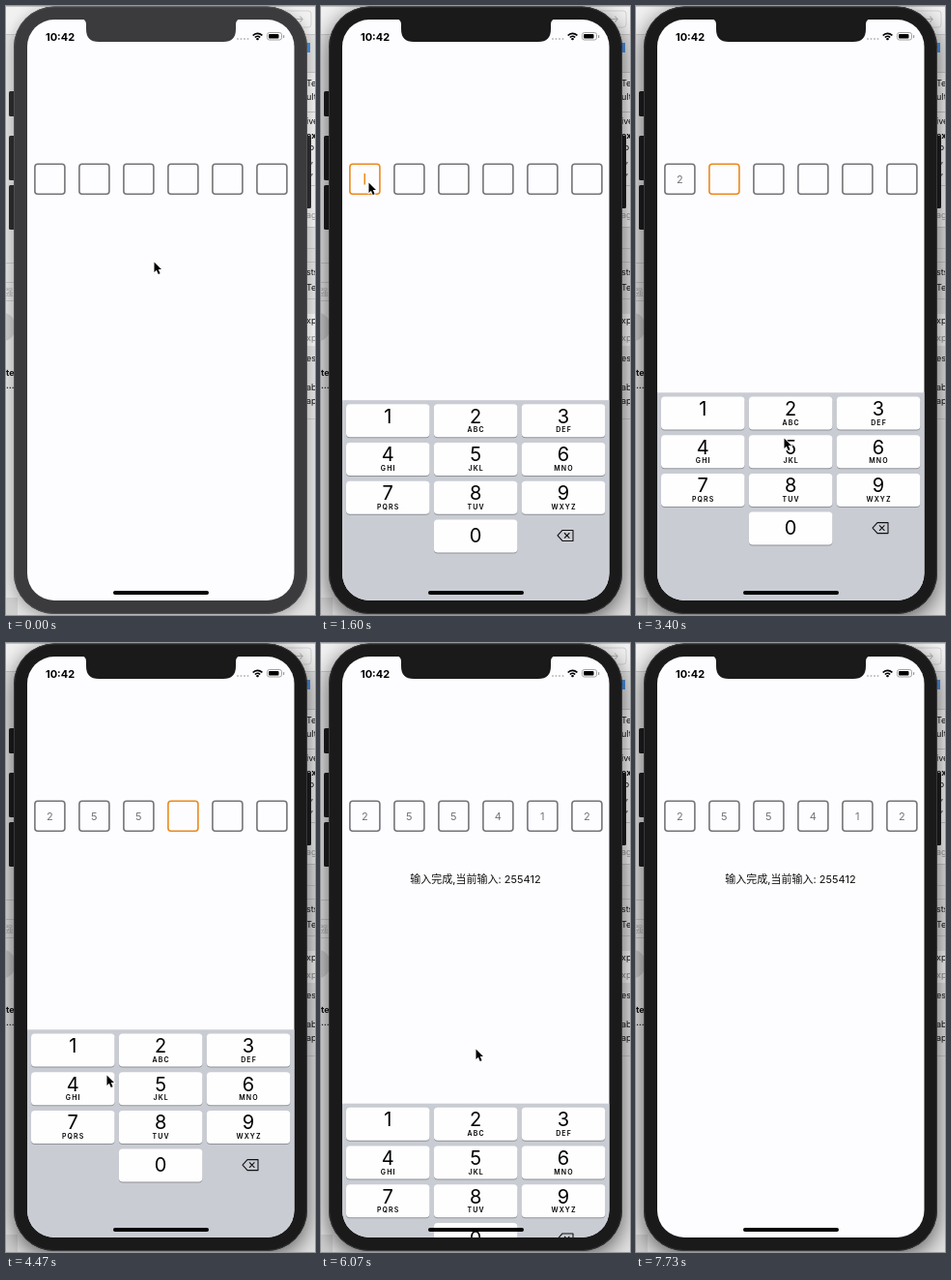
An HTML page with a canvas that plays this animation: 320 by 629 pixels, repeating every 7.87 s.

```html
<!DOCTYPE html>
<html lang="zh">
<head>
<meta charset="utf-8">
<title>Code input</title>
<style>
html, body { margin: 0; width: 100%; height: 100%; overflow: hidden; background: #ddd; }
canvas { display: block; width: 320px; height: 629px; }
</style>
</head>
<body>
<canvas id="stage" width="320" height="629"></canvas>
<script>
const c = document.getElementById('stage').getContext('2d');
const LOOP = 7870, ACTIVATE = 1200, SHOW = 1310, SELECT = 1330, DONE = 6000;
const FONT = 'Inter, "Noto Sans CJK SC", "Noto Sans CJK", sans-serif';
const ORANGE = '#e98a1d', GREY = '#747478', WHITE = '#fdfcfe';
const KEYBOARD_H = 215;

// [time typed, digit]
const typed = [[2733, 2], [3670, 5], [4000, 5], [4530, 4], [5067, 1], [DONE, 2]];

// [time, x, y]
const pointerPath = [
  [0, 153, 264], [670, 153, 264], [1130, 49, 182], [1670, 49, 182],
  [2070, 150, 408], [2270, 150, 408], [2400, 153, 412], [2870, 153, 412],
  [3330, 153, 446], [4070, 153, 446], [4330, 104, 446], [4670, 104, 446],
  [5000, 83, 418], [5330, 83, 418], [5800, 160, 419], [6800, 160, 419],
  [7330, 101, 338], [7540, 101, 338], [7700, 20, 291]
];

// [text, baseline, colour, weight] for the window edges behind the phone
const rightScraps = [
  ['Te', 83], ['ult', 97], ['ive', 122], ['ex', 137, '#111', 700], ['to', 149], ['s,', 162], ['s,', 174],
  ['a', 200, '#111', 700], ['ag', 219, '#999'], ['sts', 278], ['Tes', 294], ['xp', 328],
  ['xp', 346, '#888'], ['es', 367], ['ab', 397], ['ap', 411]
];
const letters = ['', 'ABC', 'DEF', 'GHI', 'JKL', 'MNO', 'PQRS', 'TUV', 'WXYZ'];

function rect(x, y, w, h, color) {
  c.fillStyle = color;
  c.fillRect(x, y, w, h);
}

function round(x, y, w, h, r, color) {
  c.beginPath();
  c.roundRect(x, y, w, h, r);
  c.fillStyle = color;
  c.fill();
}

function text(s, x, y, size, color = '#111', weight = 400, align = 'center') {
  c.font = `${weight} ${size}px ${FONT}`;
  c.textAlign = align;
  c.fillStyle = color;
  c.fillText(s, x, y);
}

function stroke(color, width) {
  c.strokeStyle = color;
  c.lineWidth = width;
  c.stroke();
}

function desktop() {
  rect(0, 0, 320, 629, '#e2e2e2');
  rect(0, 0, 320, 30, '#f1f1f1');
  rect(0, 0, 320, 1, '#c4c4c4');
  c.beginPath();
  c.roundRect(270, 5, 46, 17, 3);
  stroke('#d2d2d2', 1);
  text('→', 304, 17, 10, '#aaa');
  rect(0, 29, 320, 1, '#c8c8c8');
  rect(310, 38, 5, 10, '#4a90e2');
  rect(312, 68, 8, 160, '#f3f3f3');
  rect(312, 318, 8, 33, '#f6f6f6');
  for (const y of [68, 109, 185, 228, 250, 264, 302, 426]) rect(312, y, 8, 1, '#c6c6c6');
  for (const y of [265, 285, 304]) rect(0, y, 10, 1, '#c4c4c4');
  round(-16, 317, 25, 29, 12, '#c9c9c9');
  text('强', 3, 299, 9, '#aaa');
  text('te', 0, 382, 9, '#111', 700, 'left');
  text('…l', 0, 395, 9, '#111', 600, 'left');
  rect(0, 611, 12, 18, '#cfcfcf');
  for (const [s, y, color, weight] of rightScraps) text(s, 311, y, 9, color, weight, 'left');
}

function phoneBody(active) {
  const color = active ? '#1a1a1b' : '#3b3b3d';
  const button = active ? '#1d1d1f' : '#2d2d30';
  for (const [y, h] of [[88, 26], [134, 46], [185, 46]]) round(3, y, 7, h, 1.5, button);
  round(310, 134, 6, 75, 1.5, button);
  c.save();
  c.shadowColor = active ? 'rgba(0,0,0,.6)' : 'rgba(0,0,0,.3)';
  c.shadowBlur = active ? 22 : 14;
  c.shadowOffsetY = active ? 6 : 3;
  round(8, 0.5, 304, 627.5, 42, color);
  c.restore();
  c.beginPath();
  c.roundRect(8.5, 1, 303, 626.5, 41.5);
  stroke(active ? '#39393b' : '#505052', 1);
  round(22, 14, 276.5, 600, 28, WHITE);
  return color;
}

function notch(color) {
  c.beginPath();
  c.moveTo(78, 13);
  c.quadraticCurveTo(83, 14, 83, 19);
  c.lineTo(83, 24);
  c.quadraticCurveTo(83, 37, 96, 37);
  c.lineTo(225, 37);
  c.quadraticCurveTo(238, 37, 238, 24);
  c.lineTo(238, 19);
  c.quadraticCurveTo(238, 14, 243, 13);
  c.fillStyle = color;
  c.fill();
}

function statusBar() {
  text('10:42', 56, 35.5, 11, '#000', 650);
  for (let i = 0; i < 4; i++) round(239 + i * 3.5, 33, 2, 2, 1, '#bbb');
  for (const r of [3.6, 6.6]) {
    c.beginPath();
    c.arc(260.5, 35, r, -Math.PI * 0.76, -Math.PI * 0.24);
    stroke('#000', 1.7);
  }
  round(259.2, 33, 2.6, 2.3, 1, '#000');
  c.beginPath();
  c.roundRect(270.5, 27.5, 15, 7.5, 2.2);
  stroke('#999', 0.9);
  round(272, 29, 10.5, 4.5, 1, '#000');
  round(287, 30, 1.2, 3, 0.6, '#999');
}

function caretAlpha(age) {
  const p = age % 1070;
  if (p < 300) return 1;
  if (p < 440) return (440 - p) / 140;
  return p < 900 ? 0 : (p - 900) / 170;
}

function codeBoxes(t) {
  const count = typed.filter(([at]) => t >= at).length;
  const since = count ? typed[count - 1][0] : SELECT;
  for (let i = 0; i < 6; i++) {
    const x = 29 + 46 * i, active = i === count && t >= since;
    c.beginPath();
    c.roundRect(x + 0.9, 163.2, 31, 31, 3);
    stroke(active ? ORANGE : GREY, 1.6);
    if (i < count) text(typed[i][1], x + 16.3, 183, 11, GREY);
    if (active) {
      c.globalAlpha = caretAlpha(t - since);
      rect(x + 15.5, 173, 1.5, 11.5, ORANGE);
      c.globalAlpha = 1;
    }
  }
  if (count === 6) text('输入完成,当前输入: 255412', 160, 247.5, 11, '#111');
}

function key(n, x, y, pressed) {
  round(x, y + 1, 86.5, 34, 4, '#8f9298');
  round(x, y, 86.5, 34, 4, pressed ? '#b4b8c1' : '#fefefe');
  const mid = x + 43.2;
  text(n, mid, y + (n ? 19.3 : 23.5), 20, '#000');
  if (letters[n - 1]) {
    c.letterSpacing = '1.1px';
    text(letters[n - 1], mid + 0.5, y + 29, 7, '#000', 600);
    c.letterSpacing = '0px';
  }
}

function backspace(x, y) {
  c.beginPath();
  c.moveTo(x - 8, y);
  c.lineTo(x - 3, y - 5.5);
  c.lineTo(x + 8, y - 5.5);
  c.lineTo(x + 8, y + 5.5);
  c.lineTo(x - 3, y + 5.5);
  c.closePath();
  c.moveTo(x - 1, y - 2.7);
  c.lineTo(x + 4.4, y + 2.7);
  c.moveTo(x + 4.4, y - 2.7);
  c.lineTo(x - 1, y + 2.7);
  c.lineJoin = 'round';
  stroke('#111', 1.1);
}

// critically damped spring, 1 falling to 0
function spring(age) {
  const w = Math.max(0, age) * 0.0176;
  return (1 + w) * Math.exp(-w);
}

function keyboard(t) {
  const hidden = t < DONE ? spring(t - SHOW) : 1 - spring(t - DONE);
  if (hidden > 0.999) return;
  const top = 399.3 + KEYBOARD_H * hidden;
  c.save();
  c.beginPath();
  c.roundRect(22, 14, 276.5, 600, 28);
  c.clip();
  rect(22, top, 277, KEYBOARD_H + 2, '#c9ccd3');
  for (let i = 0; i < 10; i++) {
    const slot = i === 9 ? 10 : i;
    const x = 26 + (slot % 3) * 90.9, y = top + 4.2 + Math.floor(slot / 3) * 39.7;
    key((i + 1) % 10, x, y, i === 3 && t >= 4500 && t < 4600);
  }
  backspace(253, top + 139.8);
  c.restore();
}

function pointer(t) {
  const i = pointerPath.findIndex(([at]) => at > t);
  if (i < 0) return;
  const [t0, x0, y0] = pointerPath[i - 1], [t1, x1, y1] = pointerPath[i];
  const u = (t - t0) / (t1 - t0), e = i === pointerPath.length - 1 ? u : u * u * (3 - 2 * u);
  c.save();
  c.translate(x0 + (x1 - x0) * e, y0 + (y1 - y0) * e);
  c.beginPath();
  c.moveTo(0.5, 0.5);
  for (const [x, y] of [[0.5, 11], [2.9, 8.8], [4.7, 13], [6.6, 12.2], [4.8, 8], [8, 8]]) c.lineTo(x, y);
  c.closePath();
  c.lineJoin = 'miter';
  stroke('#fff', 1.5);
  c.fillStyle = '#000';
  c.fill();
  c.restore();
}

function draw(t) {
  desktop();
  const color = phoneBody(t >= ACTIVATE);
  notch(color);
  statusBar();
  codeBoxes(t);
  keyboard(t);
  round(111, 604, 99, 4, 2, '#000');
  pointer(t);
}

const start = performance.now();
function frame() {
  draw((performance.now() - start) % LOOP);
  requestAnimationFrame(frame);
}
frame();
</script>
</body>
</html>
```
